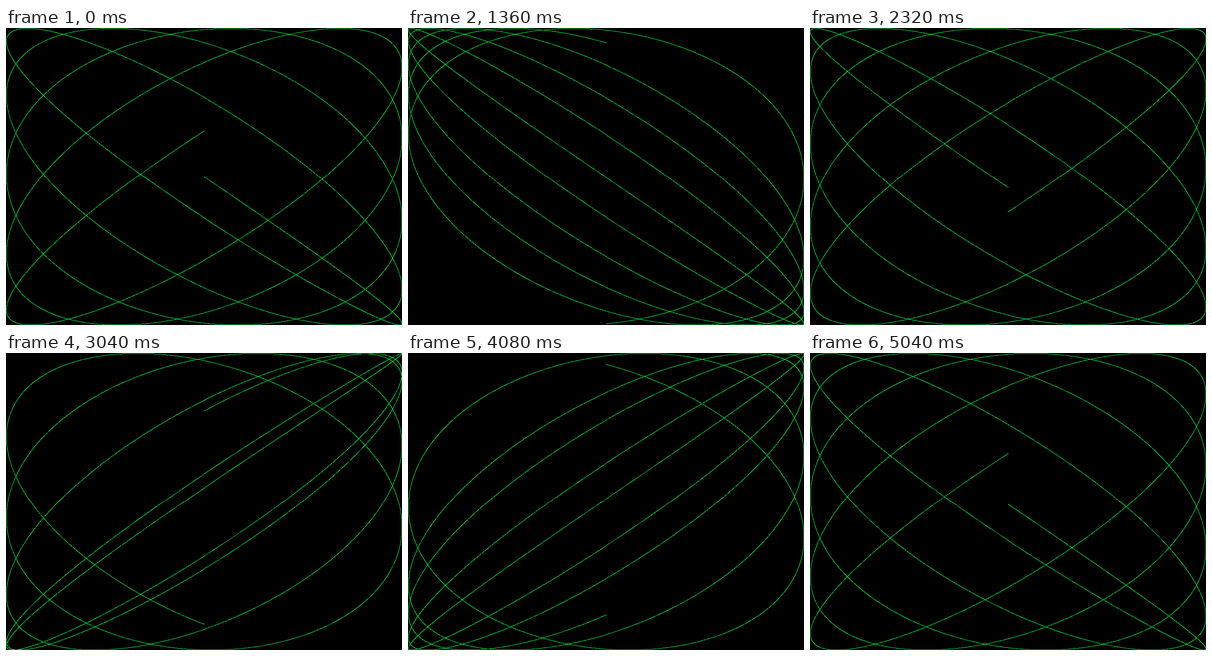
Recreate the animation shown at these times as an HTML page with a canvas. Size 864x648 px, loop 5120 ms.

```html
<!DOCTYPE html>
<html lang="en">
<head>
<meta charset="utf-8">
<title>Lissajous</title>
<style>
  html, body { margin: 0; width: 100%; height: 100%; overflow: hidden; background: #000; }
  canvas { display: block; }
</style>
</head>
<body>
<canvas id="stage" width="864" height="648"></canvas>
<script>
const W = 864, H = 648;
const STEPS = 64, STEP_MS = 80;
const CYCLES = 5, RES = 0.001, FREQ = 0.91007;

const ctx = document.getElementById('stage').getContext('2d');
const image = ctx.createImageData(W, H);
const pixels = new Uint32Array(image.data.buffer);
const BLACK = 0xff000000, GREEN = 0xff40e600; // ABGR

// Truncating toward the centre leaves a small kink on both axes.
const toPixel = (v, size) => size / 2 + Math.trunc(v * size / 2);

function plot(phase) {
  pixels.fill(BLACK);
  for (let t = 0; t < CYCLES * 2 * Math.PI; t += RES) {
    const x = toPixel(Math.sin(t), W);
    const y = toPixel(Math.sin(t * FREQ + phase), H);
    pixels[y * W + x] = GREEN;
  }
  ctx.putImageData(image, 0, 0);
}

let shown = -1;
const start = performance.now();

function tick() {
  const step = Math.floor((performance.now() - start) / STEP_MS) % STEPS;
  if (step !== shown) {
    shown = step;
    plot(step * 0.1);
  }
  requestAnimationFrame(tick);
}
tick();
</script>
</body>
</html>
```
